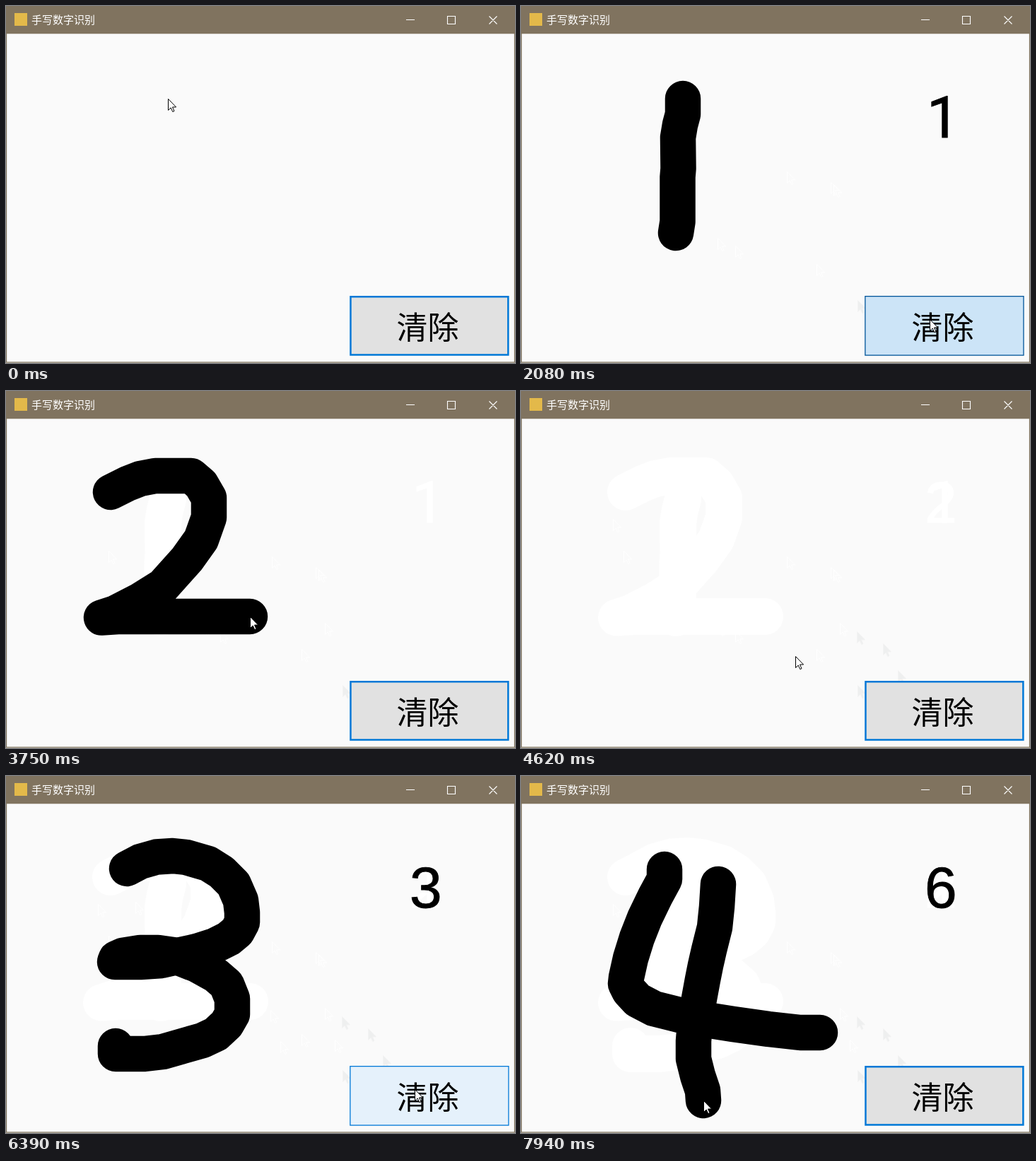
Recreate the animation shown at these times as an HTML page. Size 720 by 505 pixels, loop 8000 ms.

```html
<!DOCTYPE html>
<html lang="zh-CN">
<head>
<meta charset="utf-8">
<title>手写数字识别</title>
<style>
  html, body { margin: 0; width: 100%; height: 100%; overflow: hidden; background: #fafafa; }
  svg { display: block; width: 720px; height: 505px; }
  text { font-family: "Noto Sans CJK SC", "Noto Sans CJK", sans-serif; }
  .chrome { fill: none; stroke: #fff; stroke-width: 1.1; }
  .ink path { fill: none; stroke-linecap: round; stroke-linejoin: round; }
  .digits text { font: 82px "Liberation Sans", Arial, sans-serif; stroke-width: .9; }
  .digits .one { font-family: Roboto, sans-serif; }
</style>
</head>
<body>
<svg viewBox="0 0 720 505">
  <rect width="720" height="505" fill="#fafafa"/>
  <g id="trail"></g>
  <g id="ink" class="ink"></g>
  <g id="digits" class="digits"></g>

  <rect id="button"/>
  <text x="552.5" y="471" font-size="44">清除</text>

  <rect x=".5" y=".5" width="719" height="503.5" fill="none" stroke="#80745f" stroke-width="1.3"/>
  <rect width="720" height="39.3" fill="#80735f"/>
  <rect x="12" y="10" width="18" height="18" fill="#e3b94a"/>
  <text x="36" y="25" font-size="15" fill="#fff">手写数字识别</text>
  <path class="chrome" d="M566 19.5h12M624.5 14.5h11v11h-11zM683.5 14.5l11 11M694.5 14.5l-11 11"/>

  <path id="cursor" fill="#fff" stroke="#000"/>
</svg>
<script>
const LOOP = 8000;
const ARROW = 'M.5.5V16.5L4.2 13 6.8 18.6 9 17.6 6.5 12H11.6Z';

// Times at which the drawing advances: first, last, count
const ticks = [
  [100, 870, 8], [2850, 2970, 2], [3070, 3630, 6], [3750, 3850, 2],
  [4840, 5610, 8], [5730, 6390, 7], [6610, 7390, 8], [7510, 7940, 5]
].flatMap(([a, b, n]) => Array.from({ length: n }, (_, i) => Math.round((a + (b - a) * i / (n - 1)) / 10) * 10));

const strokes = [
  { from: 100, to: 540, clear: 2200,
    d: 'M229 131V153L225 168 222 186 222.5 230 221.5 242V305L219 321' },
  { from: 2850, to: 3750, clear: 4410,
    d: 'M148 143L172 131 190 124 211 120H262L276 132 287 151V179L276 210 256 238 222 276 190 296 155 314 135 320.5 158 319H345' },
  { from: 4840, to: 5800, clear: 6720,
    d: 'M171 131L190 121 213 114.5 236 113 255 115 286 124 305 136 322 153 332 176 334 193V207L327 220 315 230 295 240 270 248 243 254 215 250H190L165 254 156 258 154 263H190L220 261 242 256 270 267 297 282 312 295 320 315V337L312 351 297 365 278 374 222 390 196 393H155V382' },
  { from: 6940, to: 7390, clear: LOOP,
    d: 'M203 132V146L190 170 175 201 164 229 155 258 149 285 148 294 153 304 165 317 188 329 224 338 262 345 300 351 350 358 395 363H423' },
  { from: 7620, to: 7940, clear: LOOP,
    d: 'M279 153L277 185 274 214 266 246 261 268 257 288 252 315 246 350 244 375V400L250 424 257 445 258 459' }
];

const digits = [
  { char: '1', from: 650, clear: 2200, x: 574 },
  { char: '2', from: 3850, clear: 4410, x: 571 },
  { char: '3', from: 5950, clear: 6720, x: 571 },
  { char: '6', from: 7510, clear: LOOP, x: 571 }
];

// Free cursor moves: time, x, y, kind of trace left behind
const moves = [
  [0, 229, 131], [760, 376, 234, 'light'], [870, 438, 249, 'light'], [990, 442, 252, 'light'],
  [1410, 303, 339, 'light'], [1520, 278, 328, 'light'], [1640, 418, 365, 'light'],
  [1750, 476, 416, 'dark'], [1860, 560, 440], [1970, 578, 443],
  [2420, 451, 328, 'light'], [2640, 145, 226, 'light'], [2750, 130, 181, 'light'],
  [3970, 475, 340, 'dark'], [4080, 512, 357, 'dark'], [4190, 578, 443],
  [4510, 533, 395, 'dark'], [4620, 388, 375, 'light'], [4740, 183, 178, 'light'],
  [5950, 183, 352], [6060, 374, 331, 'light'], [6170, 465, 373, 'light'],
  [6280, 540, 425], [6390, 578, 443], [6830, 230, 170], [7510, 290, 170]
];

const looks = {
  focus: ['#e1e1e1', '#0078d7', 2.5],
  hot: ['#e5f1fb', '#0078d7', 1.3],
  down: ['#cce4f7', '#005499', 1.3]
};
const buttonSteps = [
  [0, 'focus'], [1860, 'hot'], [2080, 'down'], [2200, 'hot'], [2420, 'focus'],
  [4190, 'hot'], [4300, 'down'], [4410, 'hot'], [4510, 'focus'],
  [6280, 'hot'], [6610, 'down'], [6720, 'hot'], [6830, 'focus']
];

const $ = id => document.getElementById(id);
const set = (el, attrs) => { for (const k in attrs) el.setAttribute(k, attrs[k]); };
const add = (parent, tag, attrs) => {
  const el = document.createElementNS('http://www.w3.org/2000/svg', tag);
  set(el, attrs);
  return parent.appendChild(el);
};
const show = (el, on) => { el.style.display = on ? '' : 'none'; };
const at = (x, y) => `translate(${x} ${y})`;

set($('cursor'), { d: ARROW });
for (const s of strokes) {
  s.el = add($('ink'), 'path', { d: s.d });
  s.length = s.el.getTotalLength();
}
for (const g of digits) {
  g.el = add($('digits'), 'text', { x: g.x, y: 185.5, class: g.char === '1' ? 'one' : '' });
  g.el.textContent = g.char;
}
const traces = moves.flatMap(([, x, y, kind], i) => kind ? [{
  from: moves[i + 1][0],
  el: add($('trail'), 'path', {
    d: ARROW, transform: at(x, y),
    fill: kind === 'dark' ? '#eeefef' : 'none',
    stroke: kind === 'dark' ? '#f3f3f3' : '#fff'
  })
}] : []);

function render(t) {
  const tick = ticks.findLast(k => k <= t) ?? 0;
  let [start, x, y] = moves.findLast(m => m[0] <= t);

  for (const s of strokes) {
    const on = tick >= s.from, gone = t >= s.clear;
    show(s.el, on);
    if (!on) continue;
    const done = Math.max(.1, s.length * Math.min(1, (tick - s.from) / (s.to - s.from)));
    set(s.el, {
      stroke: gone ? '#fff' : '#000',
      'stroke-width': gone ? 52 : 50.5,
      'stroke-dasharray': done >= s.length ? 'none' : `${done} ${s.length * 2}`
    });
    if (s.from > start) ({ x, y } = s.el.getPointAtLength(done));
  }
  for (const g of digits) {
    const color = t >= g.clear ? '#fff' : '#000';
    show(g.el, t >= g.from);
    set(g.el, { fill: color, stroke: color });
  }
  for (const g of traces) show(g.el, t >= g.from);

  const [fill, stroke, w] = looks[buttonSteps.findLast(b => b[0] <= t)[1]];
  set($('button'), {
    x: 486.2 + w / 2, y: 410 + w / 2, width: 225.4 - w, height: 84.7 - w,
    fill, stroke, 'stroke-width': w
  });
  set($('cursor'), { transform: at(Math.round(x), Math.round(y)) });
}

const begin = performance.now();
function frame() {
  render((performance.now() - begin) % LOOP);
  requestAnimationFrame(frame);
}
frame();
</script>
</body>
</html>
```
